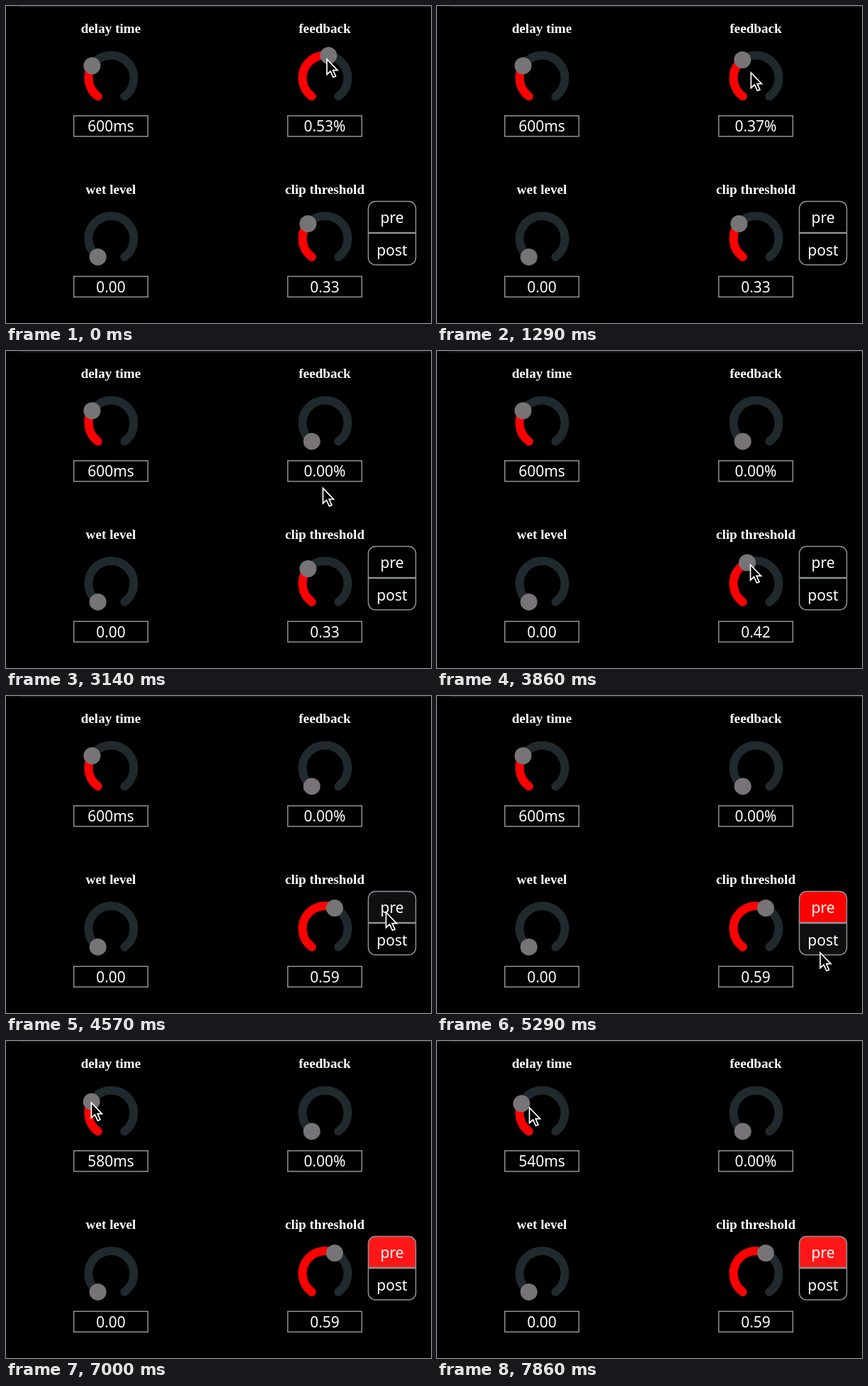
These frames come from a looping animation (600x447 px, 8000 ms). An HTML page:

```html
<!DOCTYPE html>
<html lang="en">
<head>
<meta charset="utf-8">
<title>Delay controls</title>
<style>
  html, body { margin: 0; width: 100%; height: 100%; overflow: hidden; background: #000; }
  svg { display: block; width: 100%; height: 100%; }
  text { fill: #fff; text-anchor: middle; font: 500 21px "Noto Sans", sans-serif; }
  .title { font: bold 19.2px "Liberation Serif", serif; }
  .arc { fill: none; stroke: #20292d; stroke-width: 12; stroke-linecap: round; }
  .level { stroke: #f00; }
  .thumb { fill: #767476; }
  .frame { fill: none; stroke: #8c9496; stroke-width: 1.5; }
</style>
</head>
<body>
<svg viewBox="0 0 600 447">
  <rect width="600" height="2" fill="#151518"/>
  <rect width="19" height="2" fill="#0b0b0d"/>
  <g id="knobs"></g>
  <path id="pre" d="M511.5 320V285.5a10 10 0 0 1 10-10H568.5a10 10 0 0 1 10 10V320Z"/>
  <path id="post" d="M511.5 320V355a10 10 0 0 0 10 10H568.5a10 10 0 0 0 10-10V320Z"/>
  <rect class="frame" x="511.5" y="275.5" width="67" height="89.5" rx="10"/>
  <path class="frame" d="M511.5 320H578.5" style="stroke-width:2.5"/>
  <text x="545" y="305.5">pre</text>
  <text x="545" y="351.5">post</text>
  <path id="cursor" d="M1 2V23.5L6 19L10 27.5L13.5 26L9.7 17.7H16Z" fill="#000" stroke="#fff" stroke-width="1.7"/>
</svg>
<script>
const STEPS = 56, LOOP = 8000, RADIUS = 32, LAG = .16;
const $ = id => document.getElementById(id);
const clamp = v => Math.max(0, Math.min(1, v));
const ease = p => p * p * (3 - 2 * p);

// The pointer glides to (x, y) between two steps and rests in the gaps.
const moves = [
  [0, 2, 448.5, 74], [3, 9, 442.3, 92], [9, 16, 443.6, 104],        // drag feedback
  [16, 19, 447, 135], [19, 20, 451, 171], [21, 25, 422, 301],
  [26, 28, 461, 298],                                               // drag clip threshold
  [30, 32, 535.5, 303], [35, 37, 540, 360], [37, 39, 536, 351],     // buttons
  [40, 43, 173, 135], [43, 46, 119, 82.5],
  [48, 52, 122, 98], [52, 55, 129.5, 92]                            // drag delay time
];

function pointer(step) {
  return moves.reduce(([px, py], [from, to, x, y]) => {
    const p = ease(clamp((step - from) / (to - from)));
    return [px + (x - px) * p, py + (y - py) * p];
  }, [452, 73]);
}

// A knob turns to face the pointer's hot spot.
function turn(cx, cy, step) {
  const [x, y] = pointer(step - LAG);
  const angle = Math.atan2(x + 2.5 - cx, cy - y - 2) / Math.PI + 2;
  return clamp((angle - 1.2) / 1.6);
}

const fixed = v => v.toFixed(2);

function knob(title, x, y, format, initial, press = Infinity, release = STEPS) {
  const g = document.createElementNS("http://www.w3.org/2000/svg", "g");
  const arc = "M-18.8 25.9A32 32 0 1 1 18.8 25.9";
  g.setAttribute("transform", `translate(${x} ${y})`);
  g.innerHTML = `<text class="title" x="-.5" y="-63.5">${title}</text>
    <path class="arc" d="${arc}"/>
    <path class="arc level" d="${arc}" pathLength="1"/>
    <circle class="thumb" r="12"/>
    <rect class="frame" x="-52.8" y="53.3" width="104.6" height="29"/>
    <text class="value" x="-.5" y="75.5"></text>`;
  $("knobs").append(g);
  const [level, thumb, label] = [".level", ".thumb", ".value"].map(s => g.querySelector(s));
  return step => {
    const v = step < press ? initial : turn(x, y, Math.min(step, release));
    const angle = Math.PI * (1.2 + 1.6 * v);
    level.setAttribute("stroke-dasharray", `${v} 2`);
    thumb.setAttribute("cx", RADIUS * Math.sin(angle));
    thumb.setAttribute("cy", -RADIUS * Math.cos(angle));
    label.textContent = format(v);
  };
}

const knobs = [
  knob("delay time", 148.5, 101.5, v => Math.round(v * 200) * 10 + "ms", .3, 49),
  knob("feedback", 450.5, 101.5, v => fixed(v) + "%", .53, 0, 18),
  knob("wet level", 148.5, 328, fixed, 0),
  knob("clip threshold", 450.5, 328, fixed, .33, 25, 29)
];

function draw(ms) {
  const step = Math.floor((ms % LOOP + 5) * STEPS / LOOP) % STEPS;
  const [x, y] = pointer(step);
  knobs.forEach(update => update(step));
  $("cursor").setAttribute("transform", `translate(${x} ${y})`);

  const idle = (top, bottom) =>
    x > 511 && x < 579 && y > top && y < bottom ? "#100e11" : "#000";
  $("pre").setAttribute("fill", step >= 49 ? "#ff1717" : step >= 34 ? "#f00" : idle(275, 320));
  $("post").setAttribute("fill", idle(320, 365));
}

const start = performance.now();
function tick() {
  draw(performance.now() - start);
  requestAnimationFrame(tick);
}
tick();
</script>
</body>
</html>
```
